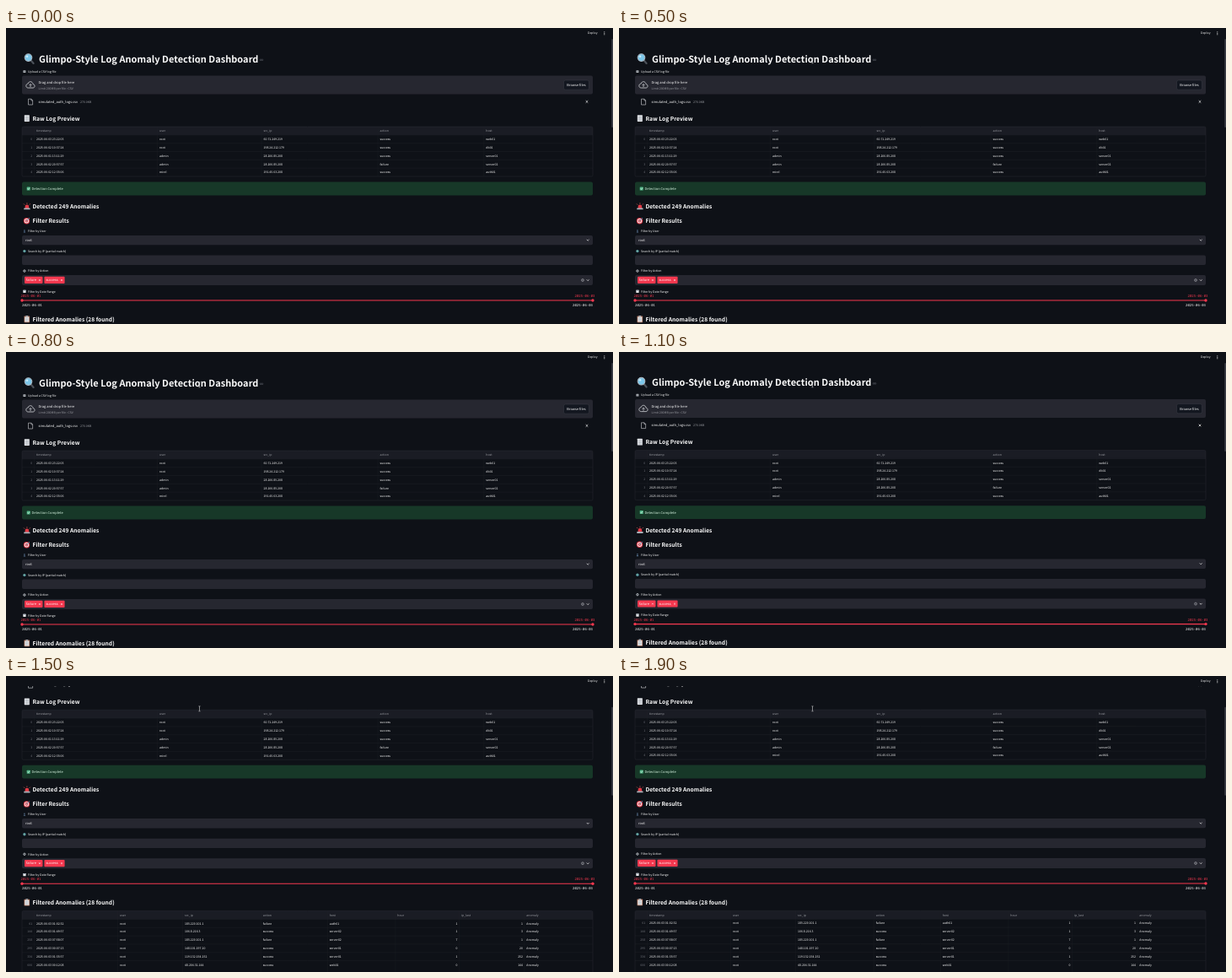
Recreate the animation shown at these times as an HTML page with a canvas. Size 720 px wide and 351 px high, loop 2 s.

```html
<!DOCTYPE html>
<html lang="en">
<head>
<meta charset="utf-8">
<title>Log Anomaly Detection Dashboard</title>
<style>
  html, body { margin: 0; width: 100%; height: 100%; overflow: hidden; background: #0e1117; }
  canvas { display: block; width: 720px; height: 351px; }
</style>
</head>
<body>
<canvas id="stage"></canvas>
<script>
const W = 720, H = 351, LOOP = 2000;
const LEFT = 19, RIGHT = 696, ROW = 9.84;
const BG = '#0e1117', PANEL = '#262730', WHITE = '#fafafa', GRAY = '#9a9ca2', DIM = '#70737a';
const RED = '#f5384f', LINE = '#24272e';
const SANS = '"Noto Sans CJK JP", "Noto Sans CJK SC", "Noto Sans CJK", "Noto Sans", sans-serif';
const MONO = '"Noto Sans Mono", "DejaVu Sans Mono", monospace';
const BODY = 4.5, SMALL = 3.94;

const canvas = document.getElementById('stage');
const ctx = canvas.getContext('2d');
const ratio = window.devicePixelRatio || 1;
canvas.width = W * ratio;
canvas.height = H * ratio;

// Glyphs are set ten times larger and scaled down, to keep fractional advances.
function text(str, x, y, { size = SMALL, color = WHITE, weight = 400, align = 'left', mono = false } = {}) {
  ctx.save();
  ctx.translate(x, y + size * 0.32);
  ctx.scale(0.1, 0.1);
  ctx.font = `${weight} ${size * 10 / (mono ? 1 : 1.12)}px ${mono ? MONO : SANS}`;
  ctx.textAlign = align;
  ctx.fillStyle = color;
  ctx.fillText(str, 0, 0);
  ctx.restore();
}

function box(x, y, w, h, fill, radius = 0, stroke) {
  ctx.beginPath();
  ctx.roundRect(x, y, w, h, radius);
  if (fill) { ctx.fillStyle = fill; ctx.fill(); }
  if (stroke) { ctx.strokeStyle = stroke; ctx.lineWidth = 0.4; ctx.stroke(); }
}

function disc(x, y, r, fill) {
  ctx.beginPath();
  ctx.arc(x, y, r, 0, Math.PI * 2);
  ctx.fillStyle = fill;
  ctx.fill();
}

function ring(x, y, r, color, width) {
  ctx.beginPath();
  ctx.arc(x, y, r, 0, Math.PI * 2);
  ctx.strokeStyle = color;
  ctx.lineWidth = width;
  ctx.stroke();
}

function path(points, color, width = 0.6) {
  ctx.beginPath();
  points.forEach(([x, y]) => ctx.lineTo(x, y));
  ctx.strokeStyle = color;
  ctx.lineWidth = width;
  ctx.stroke();
}

function cross(x, y, r, color = WHITE, width = 0.6) {
  path([[x - r, y - r], [x + r, y + r]], color, width);
  path([[x - r, y + r], [x + r, y - r]], color, width);
}

const chevron = y => path([[688.8, y - 0.7], [690.2, y + 0.7], [691.6, y - 0.7]], WHITE, 0.7);

const icons = {
  magnifier(y) {
    ctx.lineCap = 'round';
    path([[29.6, y + 2], [32.6, y + 5.4]], '#4b5058', 2.2);
    ctx.lineCap = 'butt';
    disc(26.5, y - 1.4, 4.4, '#7cc7ea');
    ring(26.5, y - 1.4, 4.3, '#aab4bd', 1.1);
    disc(25, y - 2.8, 1.3, '#c9ecfa');
  },
  page(y) {
    box(21.8, y - 4, 6, 7.8, '#e4e6ea', 0.4);
    for (let i = 0; i < 4; i++) path([[22.8, y - 2 + i * 1.4], [26.8, y - 2 + i * 1.4]], '#8d949e', 0.5);
  },
  siren(y) {
    box(22.6, y - 2, 4.6, 5, '#e33a45', [2.2, 2.2, 0, 0]);
    box(21.2, y + 2, 7.4, 1.8, '#a9b0b8', 0.4);
    path([[21, y - 3], [22.2, y - 1.8]], '#f0625e', 0.7);
    path([[28.8, y - 3], [27.6, y - 1.8]], '#f0625e', 0.7);
    path([[24.9, y - 4.2], [24.9, y - 2.8]], '#f0625e', 0.7);
  },
  target(y) {
    [[3.7, '#dc3644'], [2.7, '#f0eeee'], [1.8, '#dc3644'], [0.8, '#f0eeee']]
      .forEach(([r, color]) => disc(24.5, y + 0.2, r, color));
    path([[24.5, y + 0.2], [27.8, y - 3.3]], '#5c91b8', 0.9);
  },
  clipboard(y) {
    box(21.5, y - 3.6, 6.6, 7.6, '#a9705a', 0.6);
    box(22.3, y - 2.6, 5, 5.9, '#eceef0');
    box(23.4, y - 4.2, 2.8, 1.6, '#a8b0b8', 0.4);
    for (let i = 0; i < 3; i++) path([[23, y - 1 + i * 1.5], [26.6, y - 1 + i * 1.5]], '#9199a2', 0.5);
  },
  folder(y) {
    box(20.4, y - 1.3, 3, 2.8, '#b4b8bd', 0.3);
    path([[20.8, y], [23, y]], '#555b64', 0.5);
  },
  person(y) {
    disc(21.9, y - 0.9, 0.8, '#56718f');
    box(20.8, y + 0.2, 2.2, 1.4, '#56718f', [0.9, 0.9, 0, 0]);
  },
  globe(y) {
    disc(21.9, y, 1.7, '#4f95a8');
    box(21.1, y - 1, 1.2, 1.6, '#8db989', 0.5);
  },
  gear(y) {
    ring(21.9, y, 1.2, '#c5c9ce', 0.9);
    disc(21.9, y, 0.5, '#8c929a');
  },
  calendar(y) {
    box(20.3, y - 1.6, 3.3, 3.3, '#e4e6e9', 0.3);
    box(20.3, y - 1.6, 3.3, 1, '#a6b1bc', 0.2);
  }
};

function heading(icon, str, y) {
  icons[icon](y);
  text(str, 31.5, y, { size: 7.5, weight: 700 });
}

function label(icon, str, y) {
  icons[icon](y);
  text(str, 26, y);
}

// Columns: [title, text x, right-aligned value x (optional)]; each row starts with its index.
function table(top, columns, rows, height) {
  box(LEFT, top, RIGHT - LEFT, ROW, '#1a1c24', [1.5, 1.5, 0, 0]);
  for (let i = 1; i <= rows.length; i++) path([[LEFT, top + i * ROW], [RIGHT, top + i * ROW]], LINE, 0.35);
  columns.forEach(([title, x, valueRight], c) => {
    path([[x - 2.4, top], [x - 2.4, top + height]], LINE, 0.3);
    text(title, x, top + ROW / 2, { color: GRAY });
    rows.forEach((row, r) => {
      const y = top + (r + 1.5) * ROW;
      text(row[c + 1], valueRight || x, y, { align: valueRight ? 'right' : 'left' });
    });
  });
  rows.forEach((row, r) => text(row[0], 31.2, top + (r + 1.5) * ROW, { color: DIM, align: 'right' }));
  box(LEFT, top, RIGHT - LEFT, height, null, 1.5, '#2e3138');
}

const previewColumns = [['timestamp', 36], ['user', 182], ['src_ip', 305.5], ['action', 443.5], ['host', 569.3]];
const previewRows = [
  '0|2025-06-03 23:22:03|root|60.71.249.219|success|web01',
  '1|2025-06-02 10:37:24|root|198.24.212.179|success|db01',
  '2|2025-06-01 13:11:29|admin|28.206.85.208|success|server01',
  '3|2025-06-02 20:57:57|admin|28.206.85.208|failure|server02',
  '4|2025-06-02 12:35:06|mirel|191.45.63.208|success|auth01'
].map(row => row.split('|'));

const anomalyColumns = [['timestamp', 36], ['user', 135], ['src_ip', 212], ['action', 304.7], ['host', 383.7],
  ['hour', 464.3, 535.5], ['ip_last', 540, 613], ['anomaly', 617.3]];
const anomalyRows = [
  '61|2025-06-03 01:02:32|root|185.220.101.1|failure|auth01|1|1',
  '144|2025-06-03 01:49:57|root|106.8.216.3|success|server02|1|3',
  '258|2025-06-03 07:58:07|root|185.220.101.1|failure|server02|7|1',
  '295|2025-06-03 00:07:13|root|148.101.197.20|success|server01|0|20',
  '334|2025-06-03 01:35:57|root|119.132.154.252|success|server01|1|252',
  '606|2025-06-03 00:12:08|root|48.204.31.144|success|web01|0|144'
].map(row => [...row.split('|'), 'Anomaly']);

function uploader() {
  label('folder', 'Upload a CSV log file', 51.5);
  box(LEFT, 56.5, RIGHT - LEFT, 22, PANEL, 2);
  ctx.beginPath();
  ctx.moveTo(26.3, 71);
  ctx.bezierCurveTo(23, 71, 23, 66.3, 26.2, 66);
  ctx.bezierCurveTo(27, 62.6, 31.6, 63, 32, 66.6);
  ctx.bezierCurveTo(34.8, 66.8, 34.6, 71, 32, 71);
  ctx.closePath();
  ctx.strokeStyle = '#d0d2d6';
  ctx.lineWidth = 0.8;
  ctx.stroke();
  path([[29, 70], [29, 66.6]], '#d0d2d6', 0.8);
  path([[27.5, 68], [29, 66.5], [30.5, 68]], '#d0d2d6', 0.7);
  text('Drag and drop file here', 38.5, 65, { size: BODY });
  text('Limit 200MB per file • CSV', 38.5, 72, { color: GRAY });
  box(661.5, 62, 30, 11.2, '#131720', 2, '#42454d');
  text('Browse files', 676.5, 67.7, { size: BODY, align: 'center' });

  path([[30, 84.2], [26.5, 84.2], [26.5, 91], [31.6, 91], [31.6, 85.8], [30, 84.2], [30, 86], [31.6, 86]], '#d0d2d6', 0.6);
  text('simulated_auth_logs.csv', 38.5, 87.4, { size: BODY });
  text('270.0KB', 88, 87.4, { color: GRAY });
  cross(689, 87.4, 1.3, WHITE, 0.7);
}

function chip(str, x, w) {
  box(x, 294.8, w, 8.2, RED, 1);
  text(str, x + 2, 298.8, { size: BODY });
  cross(x + w - 3.6, 299, 0.8);
}

function filters() {
  const field = (y, h = 11.4) => box(LEFT, y, RIGHT - LEFT, h, PANEL, 2);
  heading('target', 'Filter Results', 228.5);
  label('person', 'Filter by User', 241);
  field(245.9);
  text('root', 23, 251.5, { size: BODY });
  chevron(251.5);

  label('globe', 'Search by IP (partial match)', 264.6);
  field(269.5);

  label('gear', 'Filter by Action', 288.1);
  field(293, 12);
  chip('failure', 22, 21.5);
  chip('success', 45.4, 24.2);
  ring(684, 299, 1.5, '#b8bac0', 0.5);
  cross(684, 299, 0.6, '#b8bac0', 0.4);
  chevron(299);

  label('calendar', 'Filter by Date Range', 312.4);
  const date = (str, x, y, align, color) => text(str, x, y, { size: 4, mono: true, align, color });
  date('2025-06-01', 17.5, 317.8, 'left', RED);
  date('2025-06-03', 698.5, 317.8, 'right', RED);
  path([[LEFT, 323], [RIGHT, 323]], RED, 1.1);
  disc(LEFT, 323, 1.7, RED);
  disc(RIGHT, 323, 1.7, RED);
  date('2025-06-01', LEFT, 328.8, 'left', WHITE);
  date('2025-06-03', RIGHT, 328.8, 'right', WHITE);
}

function page() {
  icons.magnifier(36.5);
  text('Glimpo-Style Log Anomaly Detection Dashboard', 39, 36.6, { size: 12.375, weight: 700 });
  ring(302, 37.8, 0.9, '#5b5e66', 0.5);
  ring(304, 37.8, 0.9, '#5b5e66', 0.5);
  uploader();

  heading('page', 'Raw Log Preview', 107.2);
  table(117, previewColumns, previewRows, 6 * ROW);

  box(LEFT, 182.6, RIGHT - LEFT, 15.8, '#173828', 2);
  box(24.7, 188.5, 4, 4, '#52b788', 0.5);
  path([[25.5, 190.5], [26.4, 191.5], [28, 189.4]], WHITE, 0.6);
  text('Detection Complete', 30.5, 190.5, { size: BODY, color: '#dffde9' });

  heading('siren', 'Detected 249 Anomalies', 211.5);
  filters();
  heading('clipboard', 'Filtered Anomalies (28 found)', 345.2);
  table(355.4, anomalyColumns, anomalyRows, 110);
}

function overlay(scroll) {
  box(0, 0, W, 12, BG);
  text('Deploy', 690, 6.2);
  for (let i = -1; i <= 1; i++) disc(709.8, 6.2 + i * 1.5, 0.5, WHITE);
  box(718.3, 13 + scroll * 0.31, 1.7, 105, '#3a3d45', 0.8);
  path([[229.5, 36], [229.5, 41.6]], '#d8d8d8', 0.6);
  path([[228.4, 35.8], [230.6, 35.8]], '#d8d8d8', 0.5);
  path([[228.4, 41.8], [230.6, 41.8]], '#d8d8d8', 0.5);
}

// The wheel jump lands near its end, then settles in 100 ms steps.
function scrollAt(time) {
  const step = Math.floor(time / 100);
  if (step < 11) return 0;
  if (step < 13) return 0.4;
  return 77 - 1.6 * 0.35 ** (step - 13);
}

function draw(now) {
  const scroll = scrollAt(now % LOOP);
  ctx.setTransform(ratio, 0, 0, ratio, 0, 0);
  ctx.textRendering = 'geometricPrecision';
  box(0, 0, W, H, BG);
  ctx.save();
  ctx.translate(0, -scroll);
  page();
  ctx.restore();
  overlay(scroll);
}

const start = performance.now();
function tick() {
  draw(performance.now() - start);
  requestAnimationFrame(tick);
}
tick();
</script>
</body>
</html>
```
